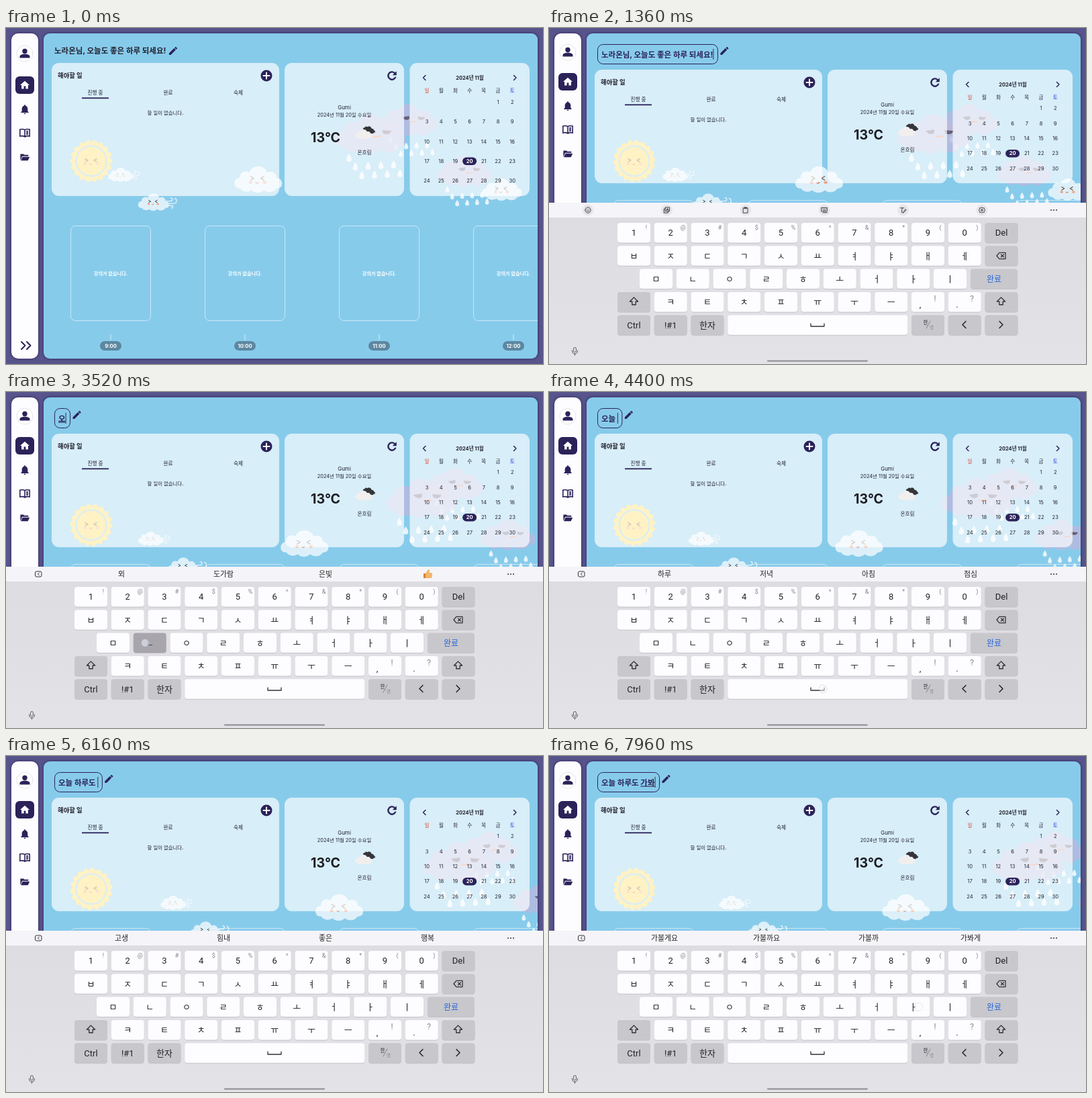
Recreate the animation shown at these times as an HTML page. Size 800 by 500 pixels, loop 8000 ms.

```html
<!DOCTYPE html>
<html lang="ko">
<head>
<meta charset="utf-8">
<title>Greeting editor</title>
<style>
  html, body { margin: 0; width: 100%; height: 100%; overflow: hidden; background: #58548c; }
  svg { display: block; width: 100vw; height: 100vh; }
  text { font-family: Inter, "Noto Sans CJK KR", "Noto Sans CJK", "Noto Sans", sans-serif; white-space: pre; }
  .keys text { font-family: Roboto, "Noto Sans CJK KR", "Noto Sans CJK", sans-serif; }
</style>
</head>
<body>
<svg id="stage" viewBox="0 0 800 500"></svg>
<script>
const LOOP = 8000, EDIT_AT = 320, SLIDE_AT = 425, SLIDE_MS = 340, HOLD = 80;
const ERASE = { down: 1600, repeat: 2000, every: 45, up: 2840 };
const NAVY = '#2b2259', INK = '#222230';
const GREETING = '노라온님, 오늘도 좋은 하루 되세요!';

// Key down time, key, text once released, suggestions
const STROKES = [
  [2960, 'ㅇ', 'ㅇ', '응 이제 아니 안녕'],
  [3230, 'ㅗ', '오', '외 도가람 은빛 👍'],
  [3480, 'ㄴ', '온', '온 온도 온라인 온통'],
  [3760, 'ㅡ', '오느', '오느라 오늘 오늘도 오늘은'],
  [4020, 'ㄹ', '오늘', '오늘 오늘도 오늘은 오늘부터'],
  [4300, ' ', '오늘 ', '하루 저녁 아침 점심'],
  [4560, 'ㅎ', '오늘 ㅎ', '하루 한 하고 할'],
  [4780, 'ㅏ', '오늘 하', '하루 하고 하는 하나'],
  [5000, 'ㄹ', '오늘 할', '할 할게 할일 할까'],
  [5200, 'ㅜ', '오늘 하루', '하루 하루종일 하루도 하루에'],
  [5440, 'ㄷ', '오늘 하룯', '하루 하루도 하루동안 하루에'],
  [5640, 'ㅗ', '오늘 하루도 '.trim(), '하루도 하루동안 하루 하루에도'],
  [5840, ' ', '오늘 하루도 ', '고생 힘내 좋은 행복'],
  [6380, 'ㄱ', '오늘 하루도 ㄱ', '그 고생 국어숙제 결과'],
  [6680, 'ㅏ', '오늘 하루도 가', '그 고생 국어숙제 결과'],
  [7080, 'ㅂ', '오늘 하루도 갑', '갑자기 갑니다 값 갑시다'],
  [7440, 'ㅗ', '오늘 하루도 가보', '가보자 가볼게요 가보고 가볼까'],
  [7840, 'ㅏ', '오늘 하루도 가봐', '가볼게요 가볼까요 가볼까 가봐게'],
];

const times = (n, f) => Array.from({ length: n }, (_, i) => f(i)).join('');
const text = (x, y, s, size, fill = INK, weight = 400, anchor = 'middle') =>
  `<text x="${x}" y="${y + size * .36}" font-size="${size}" fill="${fill}" font-weight="${weight}" text-anchor="${anchor}">${s}</text>`;
const box = (x, y, w, h, r, attrs) => `<rect x="${x}" y="${y}" width="${w}" height="${h}" rx="${r}" ${attrs}/>`;
const path = (d, attrs) => `<path d="${d}" ${attrs}/>`;
const line = (d, color, width = 1) =>
  path(d, `fill="none" stroke="${color}" stroke-width="${width}" stroke-linecap="round" stroke-linejoin="round"`);
const at = (x, y, s, body) => `<g transform="translate(${x} ${y}) scale(${s})">${body}</g>`;
const icon = (x, y, s, d, attrs = `fill="${NAVY}"`) => at(x, y, s, `<g transform="translate(-12 -12)">${path(d, attrs)}</g>`);
const outline = 'fill="none" stroke="#333" stroke-width="2" stroke-linejoin="round" stroke-linecap="round"';

const PENCIL = 'M3 17.2V21h3.8L17.8 9.9l-3.7-3.7zM20.7 7a1 1 0 0 0 0-1.4l-2.3-2.3a1 1 0 0 0-1.4 0l-1.9 1.8 3.8 3.8z';
const HOME = 'M10 20v-6h4v6h5v-8h3L12 3 2 12h3v8z';
const BELL = 'M12 22a2 2 0 0 0 2-2h-4a2 2 0 0 0 2 2zm6-6v-5c0-3-1.6-5.6-4.5-6.3V4a1.5 1.5 0 0 0-3 0v.7C7.6 5.4 6 8 6 11v5l-2 2v1h16v-1z';
const BOOK = 'M2 5c4-1 7-1 10 1v14c-3-2-6-2-10-1zM12 6c3-2 6-2 10-1v14c-4-1-7-1-10 1M15 9l4-.5M15 12l4-.5M15 15l4-.5';
const FOLDER = 'M2 19V5h7l2 2h9v3H6L3.500 17zM7 11.500h16l-4 8.500H3z';
const REFRESH = 'M17.6 6.4A8 8 0 1 0 19.7 14h-2.9A5.200 5.200 0 1 1 15.700 8.300L13 11h7V4z';

/* ---------- weather creatures ---------- */
const PUFF = 'M-40 20C-56 22-57-2-41-3C-41-17-27-20-20-15C-14-33 14-32 19-15C32-20 41-11 40-3C56-2 56 22 40 20C34 31 18 30 12 24C4 32-10 31-15 24C-23 30-36 28-40 20Z';
const smile = color => line('M-17-6l7 4-7 4M12-6l-7 4 7 4', color, 2) +
  `<ellipse cx="-17" cy="7" rx="4" ry="3" fill="#f3a07b"/><ellipse cx="14" cy="7" rx="4" ry="3" fill="#f3a07b"/>` +
  line('M-6 7q3 4 6 0', '#d9714f', 2);
const swirl = line('M42-3h14c9 0 9-13 1-11M44 5h24c12 0 12-17 3-17M42 12h17c9 1 7 10 1 8', '#e4f3fa', 3);
const white = `<g opacity=".72">${path(PUFF, 'fill="#fff"')}</g>`;
const drop = (x, y) => path(`M${x} ${y}c5 7 5 12 0 12s-5-5 0-12z`, 'fill="#e6f5fc"');
const sad = path('M-17-4l13-2v5q-7 5-13-3z M11-5l14 1q-3 7-12 4z', 'fill="#665f73"') +
  line('M-1 5l10-1', '#ea8a63', 2.500);
const rain = `<g opacity=".74"><g transform="translate(-5)">${path(PUFF, 'fill="#bdb8de"')}</g></g>${sad}` +
  times(9, i => drop(-38 + i * 9.500, 30 + (i * 13) % 27));

// x0, y, scale, speed in px/ms, drawing
const DRIFTERS = [
  [171, 218, .36, .0127, white + smile('#777') + swirl],
  [220, 259, .44, .0126, white + smile('#333') + swirl],
  [376, 225, .68, .0196, white + smile('#8a6a5c')],
  [739, 240, .57, .0253, white + smile('#6b4c40')],
  [604, 136, .82, .0195, rain],
  [549, 157, 1, .0213, rain],
  [687, 212, .78, .0185, rain],
];

const sun = times(18, i => {
  const a = i * Math.PI / 9;
  return `<circle cx="${28 * Math.cos(a)}" cy="${28 * Math.sin(a)}" r="3.600" fill="#ffd84a"/>`;
}) + '<circle r="26" fill="none" stroke="#ffd84a" stroke-width="5"/>';
const sunFace = '<circle r="21.500" fill="#ffd84a"/>' + at(1, 0, .6, smile('#5d4220'));

/* ---------- dashboard in its two layouts ---------- */
function page(editing) {
  const d = editing ? 10 : 0, side = editing ? -5 : 0, wx = editing ? -4 : 0, lower = editing ? -38 : 0;
  const rowY = editing ? 119.5 : 110, rowStep = editing ? 22.4 : 29.4;
  const card = (x, w) => box(x, 52 + d, w, editing ? 169 : 198, 11, 'fill="#fff" opacity=".68"');

  const sidebar = `<circle cx="28" cy="${editing ? 36 : 38}" r="12" fill="#fff" stroke="#e4e3ec"/>` +
    at(28, editing ? 36 : 38, 1, `<circle cy="-3.500" r="3.700" fill="${NAVY}"/>` + path('M-7.500 6.500v-2c0-5 15-5 15 0v2z', `fill="${NAVY}"`)) +
    box(14, 72 + side, 28, 26, 6, `fill="${NAVY}"`) +
    icon(28, 85 + side, .7, HOME, 'fill="#fff"') +
    icon(28, 121 + side, .72, BELL) +
    icon(28, 156 + side, .72, BOOK, `fill="none" stroke="${NAVY}" stroke-width="2.200"`) +
    icon(28, 192 + side, .66, FOLDER) +
    (editing ? '' : line('M23 467l5.500 5.500-5.500 5.500M31 467l5.500 5.500-5.500 5.500', NAVY, 2));

  const todo = card(68, 339) + text(77, 71 + d, '해야할 일', 9.4, '#1e1e2a', 700, 'start') +
    `<circle cx="388" cy="${71 + d}" r="8.500" fill="${NAVY}"/>` + line(`M383.500 ${71 + d}h9M388 ${66.5 + d}v9`, '#fff', 2) +
    text(133, 96 + d, '진행 중', 7.6, INK, 500) + text(241.5, 96 + d, '완료', 7.6, INK, 500) + text(346, 96 + d, '숙제', 7.6, INK, 500) +
    box(113, 103.4 + d, 40, 1.8, 0, `fill="${NAVY}"`) + text(237.5, 126 + d, '할 일이 없습니다.', 7.4, INK, 500);

  const weather = card(415, 178) + icon(575, 71 + d, .85, REFRESH) +
    text(504, 118 + wx, 'Gumi', 8) + text(504, 129 + wx, '2024년 11월 20일 수요일', 7.4) +
    text(476, 163 + wx, '13°C', 19.6, '#1c1c24', 700) +
    at(540, 152 + wx, .16, path(PUFF, 'fill="#35363a" transform="translate(4 -8) rotate(20)"')) +
    at(541, 152 + wx, .16, path(PUFF, 'fill="#35363a" transform="translate(4 4)"')) +
    at(533, 158 + wx, .25, path(PUFF, 'fill="#f1efed"')) +
    text(534, 185 + wx, '온흐림', 7.6);

  const days = times(30, i => {
    const cell = i + 5, x = 627 + cell % 7 * 21.2, y = rowY + Math.floor(cell / 7) * rowStep, today = i === 19;
    return (today ? box(x - 10.5, y - 5.7, 21, 11.4, 5.7, `fill="${NAVY}"`) : '') +
      text(x, y, i + 1, 7.6, today ? '#fff' : INK, today ? 700 : 400);
  });
  const calendar = card(601.5, 178.5) + text(691, 74 + d, '2024년 11월', 7.5, INK, 700) +
    line(`M625 ${70.5 + d}l-3.500 3.500 3.500 3.500M756.500 ${70.5 + d}l3.500 3.500-3.500 3.500`, NAVY, 1.5) +
    [...'일월화수목금토'].map((s, i) => text(627 + i * 21.2, 93 + d, s, 7.5, i ? i === 6 ? '#2433e8' : INK : '#e2402f')).join('') + days;

  const slots = times(4, i => {
    const x = 156 + i * 200;
    return box(x - 59.5, 294.5 + lower, 119, 141, 7, 'fill="none" stroke="#fff" stroke-opacity=".55"') +
      text(x, 365 + lower, '강의가 없습니다.', 7.2, '#fff', 700) +
      line(`M${x} ${456 + lower}v8`, '#d6edf8') + box(x - 16, 466 + lower, 32, 14, 7, 'fill="#5d87a0"') +
      text(x, 473 + lower, `${9 + i}:00`, 7.6, '#fff', 700);
  });
  return sidebar + todo + weather + calendar + `<g clip-path="url(#panel)">${slots}</g>`;
}

/* ---------- keyboard, drawn at its open position ---------- */
const KEY_W = 49, KEY_H = 29.5, PITCH = 54.75;
const rowTop = r => 290 + r * 34.3;
const keyBoxes = {};
function key(label, x, row, { w = KEY_W, grey = false, face, color = '#222', size = 13 } = {}) {
  const y = rowTop(row);
  keyBoxes[label] = { x, y, w };
  return box(x, y + 1, w, KEY_H, 4, 'fill="#c3c2c8"') + box(x, y, w, KEY_H, 4, `fill="${grey ? '#c8c7cc' : '#fdfcff'}"`) +
    (face || text(x + w / 2, y + KEY_H / 2, label, size, color));
}
const col = i => 102 + i * PITCH;
const SHIFT = 'M12 3L3 12h5v7h8v-7h5z';
const keyRow = (labels, x, row) => [...labels].map((s, i) => key(s, x + i * PITCH, row)).join('');
const keys =
  keyRow('1234567890', 102, 0) + [...'!@#$%^&*()'].map((s, i) => text(col(i) + 43, 296.5, s === '&' ? '&amp;' : s, 9, '#85848a')).join('') +
  key('Del', col(10), 0, { grey: true }) +
  keyRow('ㅂㅈㄷㄱㅅㅛㅕㅑㅐㅔ', 102, 1) +
  key('erase', col(10), 1, { grey: true, face: icon(673.5, 339, .65, 'M8 5h14v14H8l-6-7zM12 9l6 6M18 9l-6 6', outline) }) +
  keyRow('ㅁㄴㅇㄹㅎㅗㅓㅏㅣ', 135, 2) +
  key('완료', 628, 2, { w: 70, grey: true, color: '#2768d8', size: 12 }) +
  key('shiftL', col(0), 3, { grey: true, face: icon(126.5, 407, .68, SHIFT, outline) }) +
  keyRow('ㅋㅌㅊㅍㅠㅜㅡ', col(1), 3) +
  key('comma', col(8), 3, { face: text(553, 411, ',', 13) + text(575, 403, '!', 12, '#85848a') }) +
  key('dot', col(9), 3, { face: text(608, 411, '.', 13) + text(630, 403, '?', 12, '#85848a') }) +
  key('shiftR', col(10), 3, { grey: true, face: icon(673.5, 407, .68, SHIFT, outline) }) +
  key('Ctrl', col(0), 4, { grey: true }) + key('!#1', col(1), 4, { grey: true }) + key('한자', col(2), 4, { grey: true }) +
  key(' ', col(3), 4, { w: 268, face: line('M390 440v4h20v-4', '#333', 1.3) }) +
  key('lang', col(8), 4, { grey: true, face: text(561, 438, '한', 7.5) + line('M562 447l6-11', '#666', .7) + text(570, 446, '영', 6.5, '#85848a') }) +
  key('left', col(9), 4, { grey: true, face: line('M621 436.500l-5 5 5 5', '#222', 1.5) }) +
  key('right', col(10), 4, { grey: true, face: line('M671 436.500l5 5-5 5', '#222', 1.5) });

const TOOLS = [
  'M3 12a9 9 0 1 0 18 0a9 9 0 1 0-18 0M8 14q4 5 8 0M9 9v1M15 9v1',
  'M8 3h13v13H8zM8 8H3v13h13v-5M11 13l3.500-7 3.500 7M12 11h5',
  'M5 5h14v16H5zM9 3h6v4H9z',
  'M3 4h18v12H3zM7 8h1M12 8h1M17 8h1M8 12h8M7 20h14',
  'M3 5h12M9 5l-2 14M12 18l8-9 2 2-8 9-3 1z',
  'M12 3l3 2 4 0 1 4 2 3-2 3-1 4-4 0-3 2-3-2-4 0-1-4-2-3 2-3 1-4 4 0zM9 12a3 3 0 1 0 6 0a3 3 0 1 0-6 0',
];
const dots = [748, 752, 756].map(x => `<circle cx="${x}" cy="271" r="1" fill="#333"/>`).join('');
const toolbar = TOOLS.map((d, i) => {
  const x = 58 + i * 117.4;
  return `<circle cx="${x}" cy="271" r="8.500" fill="#e7e6eb"/>` + icon(x, 271, .46, d, outline);
}).join('') + dots;
const thumb = at(628, 271, 1, path('M-6-1h3v7h-3z', 'fill="#d98237"') + path('M-3 6v-7l4-6c3 0 2 3 1 5h4q2 2 0 8z', 'fill="#f2b56b"'));
const suggestions = words => box(43.5, 267, 9.5, 8, 2, 'fill="none" stroke="#333"') + line('M49.500 269l-2 2 2 2', '#333') +
  words.split(' ').map((w, i) => w === '👍' ? thumb : text(172 + i * 152, 271, w, 10.9, '#222', 500)).join('') + dots;

/* ---------- scene ---------- */
const stage = document.getElementById('stage');
stage.innerHTML = `
  <defs>
    <clipPath id="panel">${box(56, 8, 736, 484, 9, '')}</clipPath>
    <linearGradient id="tray" x2="0" y2="1"><stop stop-color="#dddce1"/><stop offset="1" stop-color="#e4e3e8"/></linearGradient>
  </defs>
  ${box(0, 0, 800, 500, 0, 'fill="#58548c"')}
  <g style="filter:drop-shadow(0 0 2px #2b2259)">${box(56, 8, 736, 484, 9, 'fill="#87cbeb"')}${box(8, 8, 40, 484, 10, 'fill="#fdfdff"')}</g>
  <g clip-path="url(#panel)"><g id="sun">${sun}</g>${at(127, 198, 1, sunFace)}
    ${DRIFTERS.map(c => `<g class="drift">${c[4]}</g>`).join('')}</g>
  <g id="rest">${page(false)}</g>
  <g id="editing">${page(true)}</g>
  <rect id="field" x="72.5" y="24.500" height="29" rx="8" fill="none" stroke="${NAVY}"/>
  <text id="greeting" y="43.500" font-size="11.5" font-weight="700"><tspan></tspan><tspan></tspan></text>
  <rect id="caret" y="31" width="1" height="16" fill="#333"/>
  <g id="pencil">${icon(0, 0, .67, PENCIL)}</g>
  <g id="keyboard" class="keys">
    ${box(0, 282, 800, 240, 0, 'fill="url(#tray)"')}${box(0, 260, 800, 22, 0, 'fill="#f5f4f8"')}
    <g id="bar"></g>${keys}
    <rect id="press" height="${KEY_H}" rx="4" fill="#55535b" opacity=".5"/>
  </g>
  <g id="system">${line('M326 495.500h148', '#8c8b91', 2)}
    ${box(36.5, 475.5, 4, 7, 2, 'fill="none" stroke="#555"')}${line('M34.500 480q0 5 4 5t4-5M38.500 485v2', '#555')}</g>
  <circle id="touch" r="6" stroke="#8f929b" stroke-width=".6"/>`;

const el = id => document.getElementById(id);
const set = (node, attrs) => { for (const k in attrs) node.setAttribute(k, attrs[k]); };
const show = (node, on) => { node.style.display = on ? '' : 'none'; };
const drifters = [...document.querySelectorAll('.drift')];
const [plainSpan, composeSpan] = el('greeting').children;
const TAPS = [
  { down: 160, up: EDIT_AT, x: 250, y: 35 },
  { down: ERASE.down, up: ERASE.up, key: 'erase' },
  ...STROKES.map(([down, key]) => ({ down, up: down + HOLD, key })),
].map(tap => {
  if (!tap.key) return tap;
  const k = keyBoxes[tap.key], x = k.x + k.w / 2;
  return { ...tap, x: x + (x < 340 ? -7 : 8), y: k.y + KEY_H / 2 };
});
let barState;

function erased(t) {
  if (t < ERASE.down) return 0;
  return t < ERASE.repeat ? 1 : 2 + Math.floor((t - ERASE.repeat) / ERASE.every);
}

function draw(t) {
  const editing = t >= EDIT_AT;
  show(el('rest'), !editing);
  show(el('editing'), editing);
  set(el('sun'), { transform: `translate(127 198) rotate(${t * .012})` });
  DRIFTERS.forEach(([x, y, s, v], i) => set(drifters[i], { transform: `translate(${x + v * t} ${y}) scale(${s})` }));

  const typed = STROKES.filter(s => t >= s[0] + HOLD).pop();
  const value = typed ? typed[2] : GREETING.slice(0, Math.max(0, GREETING.length - erased(t)));
  const wordStart = typed ? value.lastIndexOf(' ') + 1 : value.length;
  plainSpan.textContent = value.slice(0, wordStart);
  composeSpan.textContent = value.slice(wordStart);
  set(composeSpan, { 'text-decoration': 'underline' });
  set(el('greeting'), { x: editing ? 78 : 72, y: editing ? 43.5 : 37.6, fill: editing ? NAVY : '#22222e' });
  const width = value ? el('greeting').getComputedTextLength() : 0;
  show(el('field'), editing);
  set(el('field'), { width: width + 12.5 });

  const lastInput = typed ? typed[0] + HOLD : t < ERASE.down ? EDIT_AT : Math.min(t, ERASE.up);
  show(el('caret'), editing && (t - lastInput) % 1000 < 500);
  set(el('caret'), { x: 78 + width });
  const pencilAlpha = t < 160 ? 1 : t < EDIT_AT ? .2 : Math.min(1, .2 + .8 * (t - EDIT_AT) / 280);
  set(el('pencil'), { transform: `translate(${editing ? 95 + width : 82 - 72 + 239} 34)`, opacity: pencilAlpha });

  const p = Math.min(1, Math.max(0, (t - SLIDE_AT) / SLIDE_MS));
  set(el('keyboard'), { transform: `translate(0 ${240 * (1 - p) ** 2.4})` });
  show(el('keyboard'), p > 0);
  show(el('system'), p > 0);
  const bar = typed ? typed[3] : '';
  if (bar !== barState) {
    barState = bar;
    el('bar').innerHTML = bar ? suggestions(bar) : toolbar;
  }

  const tap = TAPS.find(k => t >= k.down && t < k.up + 100);
  const held = tap && t < tap.up;
  show(el('touch'), tap);
  show(el('press'), held && tap.key);
  if (tap) {
    set(el('touch'), { cx: tap.x, cy: tap.y, fill: held ? '#d5dae6' : '#fff', opacity: held ? .8 : .6 * (1 - (t - tap.up) / 100) });
    if (tap.key) {
      const { x, y, w } = keyBoxes[tap.key];
      set(el('press'), { x, y, width: w });
    }
  }
}

const start = performance.now();
function frame() {
  draw((performance.now() - start) % LOOP);
  requestAnimationFrame(frame);
}
frame();
</script>
</body>
</html>
```
